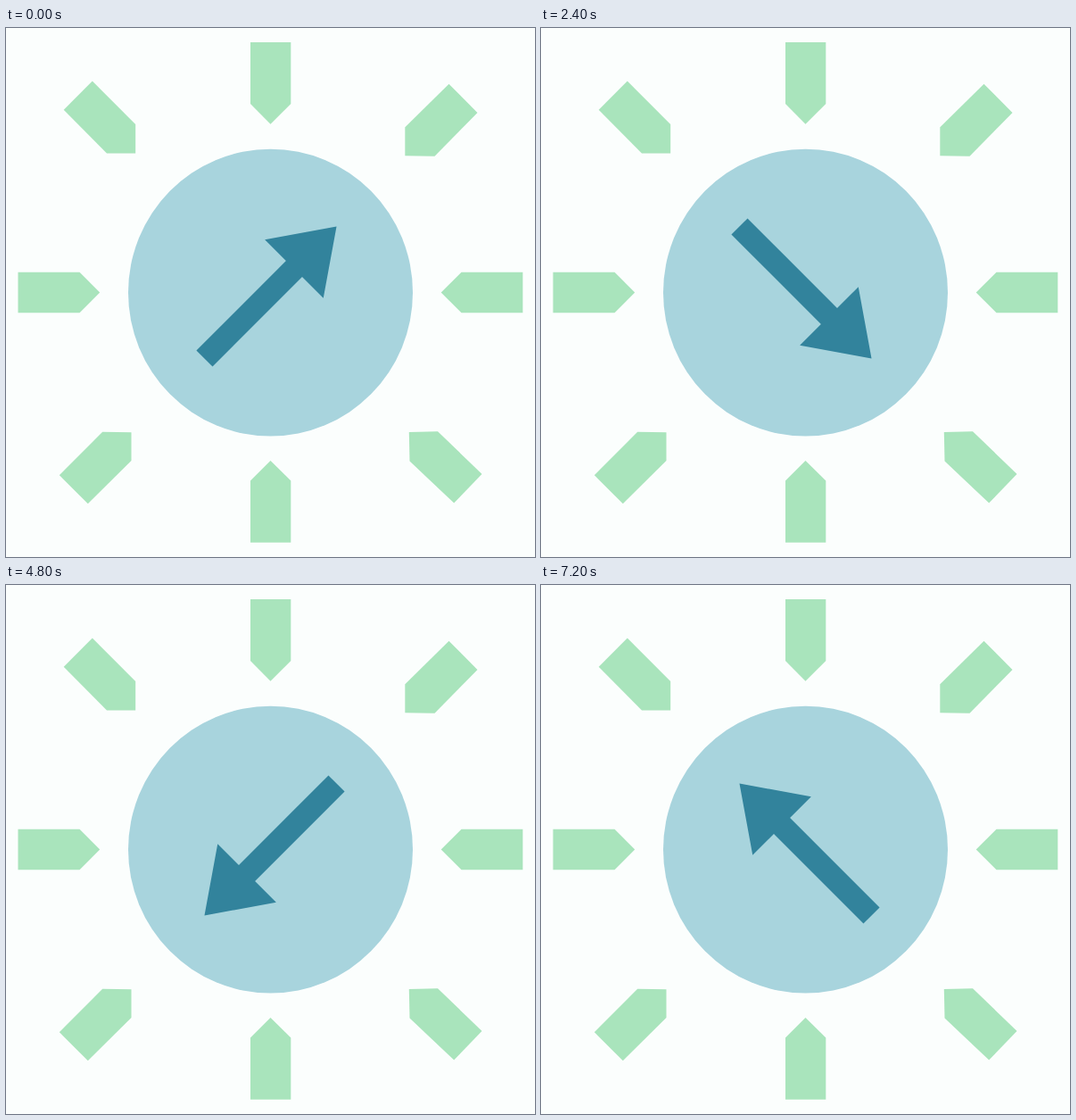
An HTML page that plays this animation: 593 by 593 pixels, repeating every 8 s.

```html
<!DOCTYPE html>
<html lang="en">
<head>
<meta charset="utf-8">
<title>Turning arrow</title>
<style>
  html, body { margin: 0; width: 100%; height: 100%; overflow: hidden; background: #fbfefd; }
  svg { display: block; width: 100%; height: 100%; }
</style>
</head>
<body>
<svg viewBox="0 0 593 593">
  <g fill="#a9e4bc">
    <path d="M274 16H319.3V85L296.5 107.8L274 85Z"/>
    <path d="M496.5 62.7L528.5 95L480.5 143.8L447.3 143.2V111.3Z"/>
    <path d="M579.3 273.8V319.2H510.5L487.7 296.5L510.5 273.8Z"/>
    <path d="M451.8 453L484 452.2L533.5 500L502.2 532.6L452.5 485.5Z"/>
    <path d="M274 576.7V507.5L296.5 485L319.3 507.5V576.7Z"/>
    <path d="M59.8 501.3L108.2 452.7L140.5 453.2V485L91.8 533.3Z"/>
    <path d="M13.5 273.8H82.5L105.2 296.5L82.5 319.2H13.5Z"/>
    <path d="M64.7 91.8L96.8 59.6L145.2 108V140.4H113Z"/>
  </g>
  <ellipse cx="296.5" cy="296.6" rx="159.5" ry="160.9" fill="#a8d4dd"/>
  <path id="arrow" fill="#32839c" d="M-104.7 -12.8H37.4V-46.4L104.7 0L37.4 46.4V12.8H-104.7Z"/>
</svg>
<script>
  const LOOP = 8000, STEP = 1200;
  const arrow = document.getElementById("arrow");

  function draw(time) {
    const turn = Math.floor((time % LOOP) / STEP);
    arrow.setAttribute("transform", `translate(296.5 296.5) rotate(${turn * 45 - 45})`);
  }

  const start = performance.now();
  function tick() {
    draw(performance.now() - start);
    requestAnimationFrame(tick);
  }
  tick();
</script>
</body>
</html>
```
